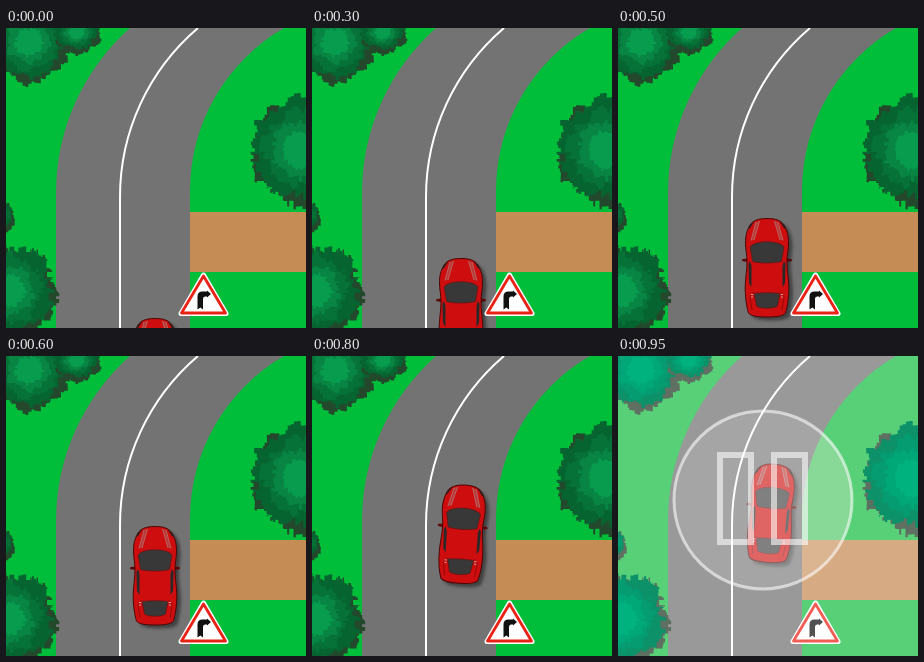
These frames come from a looping animation (300 px wide and 300 px high, 1 s). An HTML page:

```html
<!DOCTYPE html>
<html lang="en">
<head>
<meta charset="utf-8">
<title>Right bend ahead</title>
<style>
  html, body { margin: 0; width: 100%; height: 100%; overflow: hidden; }
  svg {
    display: block; width: 100vw; height: 100vh;
    --grass: #00be3a;
    --leaf0: #24482b; --leaf1: #056430; --leaf2: #067238; --leaf3: #088443; --leaf4: #089c4f;
  }
  svg.paused {
    --grass: #1abe46;
    --leaf0: #5f6f62; --leaf1: #0c9169; --leaf2: #049c70; --leaf3: #00a878; --leaf4: #00b27d;
  }
  .pause { display: none; }
  .paused .pause { display: inline; }
</style>
</head>
<body>
<svg id="stage" viewBox="0 0 300 300" xmlns="http://www.w3.org/2000/svg">
  <defs>
    <filter id="soft" x="-30%" y="-30%" width="160%" height="160%">
      <feGaussianBlur stdDeviation="1.5"/>
    </filter>
    <path id="body" d="M0-49.5C-9-49.5-14-47.500-17-43C-20.500-37-21.500-32-21.500-25
      C-21.500-18-20-14-20-6C-20 2-21.500 9-21.800 18C-22 28-20.500 39-18.500 45C-16 48.500-8 49 0 49
      C8 49 16 48.500 18.500 45C20.500 39 22 28 21.800 18C21.500 9 20 2 20-6
      C20-14 21.500-18 21.500-25C21.500-32 20.500-37 17-43C14-47.500 9-49.500 0-49.500Z"/>
    <g id="side">
      <path d="M12-46.500C16-45 18-42 19-38.500L16.500-40.500C15.500-43 14-45 12-46.500Z" fill="#222"/>
      <path d="M7.500-47L13-28L16-27.500L11-46Z" fill="#a9635e" opacity=".5"/>
      <path d="M7.500-47L13-28M11-46L16-27.500" fill="none" stroke="#b08580" stroke-width=".7"/>
      <path d="M17-7L18.500-4L18 15L15.500 19L15.500-2Z" fill="#292929"/>
      <path d="M13.500 24L17 29L15 42" fill="none" stroke="#8b0808" stroke-width=".8"/>
      <path d="M13.500 26.500H16M14 29H16" stroke="#d8b0ac" stroke-width=".9"/>
    </g>
    <path id="mirror" d="M19-9.500L24.500-9L25-7L20-6Z" fill="#5b0808"/>
  </defs>

  <rect width="300" height="300" fill="var(--grass)"/>
  <circle class="pause" cx="145" cy="144" r="89" fill="#46c25f"/>
  <rect x="184" y="184" width="116" height="60" fill="#c68c55"/>
  <path d="M50 300V165A221 221 0 0 1 124 0H278A188 188 0 0 0 184 163V300Z" fill="#737373"/>
  <path d="M114 300V169A222 222 0 0 1 192 0" fill="none" stroke="#fff" stroke-width="2"/>

  <g id="car">
    <use href="#body" x="4" y="3.500" fill="#222" opacity=".6" filter="url(#soft)"/>
    <use href="#mirror"/>
    <use href="#mirror" transform="scale(-1 1)"/>
    <use href="#body" fill="#cd0d0e" stroke="#4a0808" stroke-width="1"/>
    <use href="#side"/>
    <use href="#side" transform="scale(-1 1)"/>
    <path d="M-17-21C-13-28 13-28 17-21L14.500-6.500C7-4.500-7-4.500-14.500-6.500Z" fill="#383838" stroke="#631010" stroke-width=".6"/>
    <path d="M-13 25.500C-7 24.500 7 24.500 13 25.500L10.500 38C7 41-7 41-10.500 38Z" fill="#383838" stroke="#631010" stroke-width=".6"/>
  </g>

  <g stroke-linejoin="round">
    <path d="M197.500 247L220 285.500H175Z" fill="#fff" stroke="#fff" stroke-width="5"/>
    <path d="M197.500 248L219.500 285H175.500Z" fill="#fff" stroke="#ea2216" stroke-width="2.800"/>
    <path d="M191.500 281.500V268.500Q191.500 263.500 196.500 263.500H201V262.500L205 266L201 269.500V268.500H199Q197 268.500 197 271V281.500L194.300 279.500Z" fill="#111"/>
  </g>

  <g class="pause" fill="none" stroke="#fff">
    <rect width="300" height="300" fill="#fff" fill-opacity=".27" stroke="none"/>
    <circle cx="145" cy="144" r="89" fill="#fff" fill-opacity=".12" stroke-opacity=".58" stroke-width="3"/>
    <path d="M102 99H133V186H102ZM156 99H187V186H156Z" stroke-opacity=".58" stroke-width="6"/>
  </g>
  <g id="trees"></g>
</svg>
<script>
  const LOOP = 1000, STEP = 50;
  const stage = document.getElementById("stage");
  const car = document.getElementById("car");
  const trees = document.getElementById("trees");

  function random(seed) {
    return () => (seed = (seed * 16807) % 2147483647) / 2147483647;
  }

  // A ragged leafy outline with uneven lobes
  function leaves(cx, cy, rx, ry, rnd, rough) {
    const count = Math.round(20 + rx * 1.5);
    const phase = rnd() * 6;
    let d = "";
    for (let i = 0; i < count; i++) {
      const a = i / count * Math.PI * 2;
      const k = .93 + .05 * Math.sin(a * 5 + phase) + (rnd() - .5) * rough;
      const x = (cx + rx * k * Math.cos(a)).toFixed(1);
      const y = (cy + ry * k * Math.sin(a)).toFixed(1);
      d += i ? `H${x}V${y}` : `M${x} ${y}`;
    }
    return d + "Z";
  }

  function tree(cx, cy, rx, ry, seed) {
    const rnd = random(seed);
    [1, .95, .74, .55, .36].forEach((k, i) => {
      const lift = i ? (k - .36) * -3 : 2;
      const d = leaves(cx + lift / 2, cy + lift, rx * k, ry * k, rnd, .16 + i * .02);
      trees.innerHTML += `<path d="${d}" fill="var(--leaf${i})"/>`;
    });
  }

  tree(23, 14, 41, 41, 1713);
  tree(71, 4, 24, 21, 2909);
  tree(294, 122, 52, 55, 4421);
  tree(2, 263, 50, 49, 5807);
  tree(-10, 189, 19, 18, 7331);

  function draw(ms) {
    const step = Math.floor((ms % LOOP) / STEP);
    const k = Math.min(step, 18);
    const turn = Math.max(0, k - 12);
    const x = 149 + 4 * (turn / 6) ** 3;
    const y = 340 - 10 * k - .4 * turn;
    const angle = 4.2 * Math.sin(turn / 6 * Math.PI / 2);
    car.setAttribute("transform", `translate(${x} ${y}) rotate(${angle})`);
    stage.classList.toggle("paused", step === 19);
  }

  const start = performance.now();
  function tick() {
    draw(performance.now() - start);
    requestAnimationFrame(tick);
  }
  tick();
</script>
</body>
</html>
```
